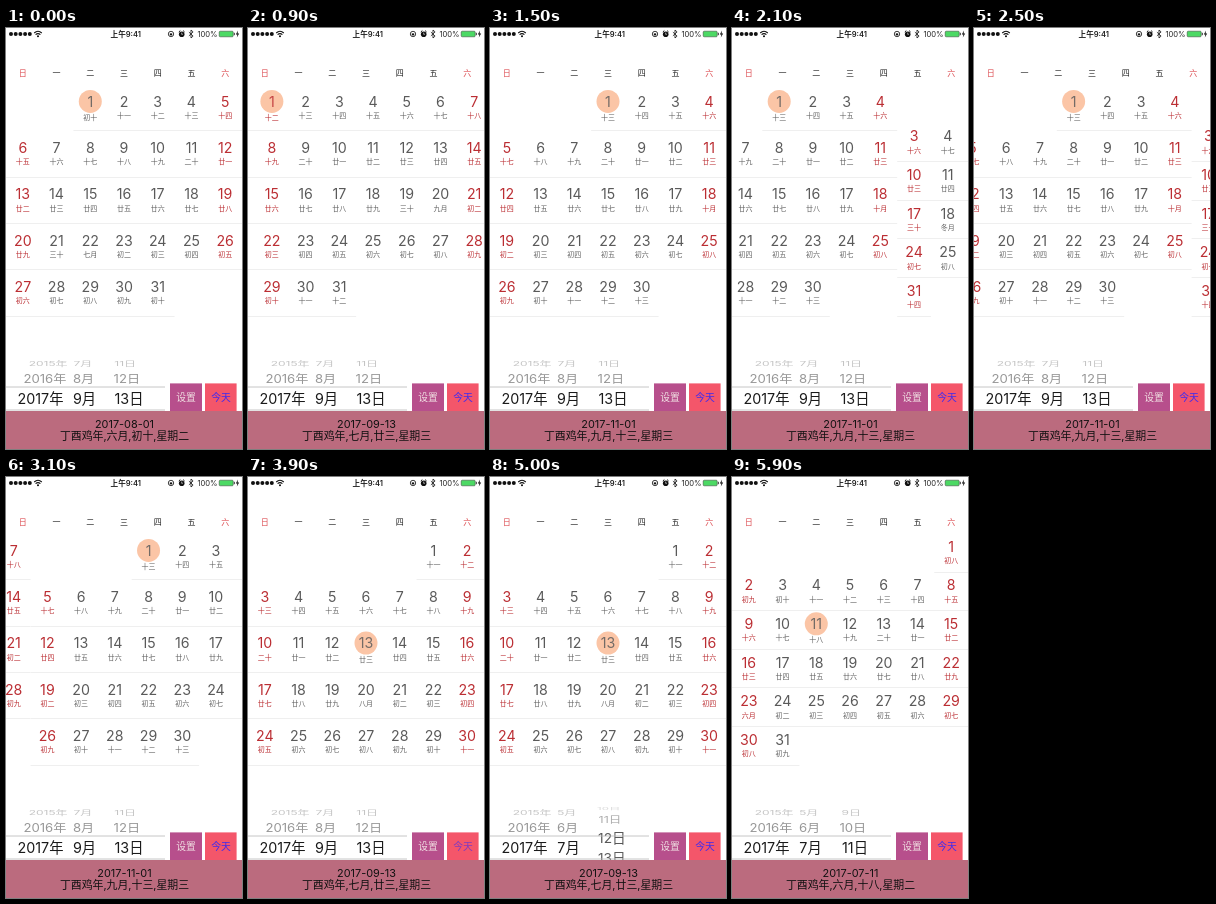
These frames come from a looping animation (236x421 px, 6 s). An HTML page:

```html
<!DOCTYPE html>
<html lang="zh-CN">
<head>
<meta charset="utf-8">
<title>Calendar</title>
<style>
  html, body { margin: 0; width: 100%; height: 100%; overflow: hidden; background: #fff; }
  svg { display: block; width: 236px; height: 421px; }
  text {
    text-anchor: middle;
    font-family: Inter, "Noto Sans CJK SC", "Noto Sans CJK", sans-serif;
  }
  .day { font-size: 14.2px; fill: #5a5a5a; }
  .lunar { font-size: 7px; fill: #606060; }
  .week { font-size: 8px; fill: #222; }
  .red { fill: #bb2e33; }
  .week.red { fill: #dc4b50; }
  .picked { fill-opacity: .85; }
  .rule { stroke: #efefef; }
  .wheel { font-size: 14.3px; fill: #1a1a1a; }
  .edge { stroke: #b8b8b8; stroke-width: .8; }
  .btn { font-size: 9.8px; }
  .caption { font-size: 10.9px; fill: #111; }
  .status { font-size: 7.6px; fill: #222; }
</style>
</head>
<body>
<svg id="stage" viewBox="0 0 236 421">
  <g id="track"></g>

  <g id="statusBar">
    <g fill="#111">
      <circle cx="5" cy="6" r="2"/><circle cx="9.7" cy="6" r="2"/><circle cx="14.4" cy="6" r="2"/>
      <circle cx="19.1" cy="6" r="2"/><circle cx="23.8" cy="6" r="2"/>
    </g>
    <g fill="none" stroke="#111" stroke-width="1.1">
      <path d="M28.2 5q3.8-3.4 7.6 0M29.6 6.7q2.4-2.2 4.8 0"/>
      <circle cx="32" cy="8.3" r=".5"/>
      <circle cx="165" cy="6" r="2.7" stroke-width=".8"/>
      <path d="M182.9 4.1l4.2 4-2.1 1.9v-8l2.1 1.9-4.2 4" stroke-width=".8"/>
    </g>
    <rect x="163.8" y="5.4" width="2.4" height="2" fill="#111"/>
    <circle cx="175.7" cy="6.2" r="2.8" fill="#111"/>
    <path d="M172.8 4l1.5-1.4M178.6 4l-1.5-1.4" stroke="#111"/>
    <path d="M175.7 4.6v1.7h1.2" stroke="#fff" stroke-width=".6" fill="none"/>
    <rect x="213.2" y="3.2" width="14" height="5.6" rx="1" fill="#4cd964" stroke="#333" stroke-width=".5"/>
    <path d="M228.3 4.8v2.4" stroke="#333"/>
    <path d="M232 2.6l-2.2 3.8h1.6l-.6 3 2.4-4h-1.6z" fill="#111"/>
  </g>
  <g id="week"></g>

  <g id="picker"></g>
  <path class="edge" d="M0 359H159M0 382H159"/>

  <rect x="164" y="355.4" width="32" height="28" fill="#b74f8c"/>
  <rect x="199" y="355.4" width="31.6" height="28" fill="#f4566a"/>
  <g id="buttons"></g>
  <rect y="383" width="236" height="38" fill="#bb6b7e"/>
  <g id="info"></g>
</svg>
<script>
const W = 236, COL = W / 7, TOP = 56.4, GRID = 231.8, LOOP = 6000, FIRST = 7;
const $ = id => document.getElementById(id);

function add(parent, tag, attrs, content) {
  const el = document.createElementNS('http://www.w3.org/2000/svg', tag);
  for (const k in attrs) el.setAttribute(k, attrs[k]);
  if (content !== undefined) el.textContent = content;
  parent.appendChild(el);
  return el;
}
const label = (parent, cls, x, y, str) => add(parent, 'text', { class: cls, x, y }, str);

// weekday of the 1st, days, lunar day of the 1st, lunar month length, next lunar month, selected day
const months = [
  [6, 31, 8, 29, '六月', 11],
  [2, 31, 10, 30, '七月', 1],
  [5, 30, 11, 29, '八月', 13],
  [0, 31, 12, 30, '九月', 1],
  [3, 30, 13, 29, '十月', 1],
  [5, 31, 14, 30, '冬月', 1]
];
const NUM = '十一二三四五六七八九';

function lunarName(n) {
  if (n === 10) return '初十';
  if (n === 20) return '二十';
  if (n === 30) return '三十';
  return '初十廿'[Math.floor(n / 10)] + NUM[n % 10];
}

function buildMonth([start, count, lunar, len, next, picked], i) {
  const page = add($('track'), 'g', { transform: `translate(${i * W} 0)` });
  const rows = Math.ceil((start + count) / 7), h = GRID / rows;
  for (let r = 0; r < rows; r++) {
    const from = r ? 0 : start, to = Math.min(7, start + count - r * 7);
    const y = Math.floor(TOP + (r + 1) * h) + .5;
    add(page, 'path', { class: 'rule', d: `M${from * COL} ${y}H${to * COL}` });
  }
  for (let d = 1; d <= count; d++) {
    const cell = start + d - 1, c = cell % 7;
    const x = (c + .5) * COL, y = TOP + (Math.floor(cell / 7) + .5) * h;
    const red = c % 6 ? '' : ' red', on = d === picked;
    const n = lunar + d - 1;
    const name = n <= len ? lunarName(n) : n === len + 1 ? next : lunarName(n - len);
    if (on) add(page, 'circle', { cx: x, cy: y - 6.2, r: 11.5, fill: '#fbc5a6' });
    label(page, 'day' + red + (on ? ' picked' : ''), x, y - .9, d);
    label(page, 'lunar' + red, x, y + (on ? 12.4 : 10.4), name);
  }
}
months.forEach(buildMonth);

[...'日一二三四五六'].forEach((s, i) =>
  label($('week'), 'week' + (i % 6 ? '' : ' red'), (i + .5) * COL, 48.2, s));
label($('statusBar'), 'status', 119.8, 8.9, '上午9:41').setAttribute('font-weight', 600);
label($('statusBar'), 'status', 201.5, 8.9, '100%');
const setBtn = label($('buttons'), 'btn', 180, 372.8, '设置');
const todayBtn = label($('buttons'), 'btn', 215, 372.8, '今天');
setBtn.setAttribute('fill', '#f0dfe2');
todayBtn.setAttribute('fill', '#3d2bf0');
const dateLine = label($('info'), 'caption', 118.5, 399.8, '');
const lunarLine = label($('info'), 'caption', 118.5, 412.4, '');

// Wheels: centre x, sideways drift of the turned rows, unit
const wheels = [[34.5, 9, '年'], [78.5, -2, '月'], [123, -4.5, '日']].map(([x, drift, unit]) => ({
  x, drift, unit, rows: Array.from({ length: 4 }, () => label($('picker'), 'wheel', 0, 5.4, ''))
}));

function turn(wheel, value) {
  const base = Math.floor(value);
  wheel.rows.forEach((el, i) => {
    const n = base + 1 - i, d = value - n, a = Math.abs(d);
    const angle = d * .506, s = 1 - .08 * a;
    const x = wheel.x + wheel.drift * Math.abs(Math.sin(angle));
    const y = 370.5 - 41 * Math.sin(angle);
    el.textContent = n + wheel.unit;
    el.setAttribute('transform', `translate(${x} ${y}) scale(${s} ${Math.max(.05, s * Math.cos(angle))})`);
    el.setAttribute('opacity', a > 2.6 ? 0 : a < 1 ? 1 - .55 * a : .45 - .2 * (a - 1));
  });
}

const smooth = u => u * u * (3 - 2 * u);
const flick = u => 1 - Math.pow(1 - u, 3.2);
const cut = u => u < 1 ? 0 : 1;

// Moves: start, end, from, to, easing
const pageMoves = [
  [0, 400, 8, 9, cut],
  [700, 1000, 9, 10, flick],
  [1100, 1400, 10, 11, flick],
  [1600, 2000, 11, 11.3, smooth],
  [2100, 2700, 11.3, 11, smooth],
  [3000, 3500, 11, 10, smooth],
  [3700, 3800, 10, 9, cut],
  [5500, 5600, 9, 7, cut]
];
const monthMoves = [[4000, 4500, 9, 7, smooth]];
const dayMoves = [[4800, 5400, 13, 11, smooth]];

function at(moves, t) {
  let value = moves[0][2];
  for (const [start, end, from, to, ease] of moves)
    if (t >= start) value = from + (to - from) * ease(Math.min(1, (t - start) / (end - start)));
  return value;
}

const captions = [
  [0, '08-01', '六月,初十,星期二'],
  [400, '09-13', '七月,廿三,星期三'],
  [1000, '10-01', '八月,十二,星期日'],
  [1400, '11-01', '九月,十三,星期三'],
  [3600, '10-01', '八月,十二,星期日'],
  [3800, '09-13', '七月,廿三,星期三'],
  [5600, '07-11', '六月,十八,星期二']
];
const within = (t, a, b) => t >= a && t < b;

function draw(t) {
  $('track').setAttribute('transform', `translate(${(FIRST - at(pageMoves, t)) * W} 0)`);
  turn(wheels[0], 2017);
  turn(wheels[1], at(monthMoves, t));
  turn(wheels[2], at(dayMoves, t));
  const [, date, lunar] = captions.filter(c => c[0] <= t).pop();
  dateLine.textContent = '2017-' + date;
  lunarLine.textContent = '丁酉鸡年,' + lunar;
  todayBtn.setAttribute('opacity', within(t, 300, 500) || within(t, 3800, 4000) ? .65 : 1);
  setBtn.setAttribute('opacity', within(t, 5500, 5700) ? .65 : 1);
}

const begin = performance.now();
let last = -1;
function tick() {
  // The picture advances ten times a second
  const t = Math.floor((performance.now() - begin) % LOOP / 100) * 100;
  if (t !== last) draw(last = t);
  requestAnimationFrame(tick);
}
tick();
</script>
</body>
</html>
```
